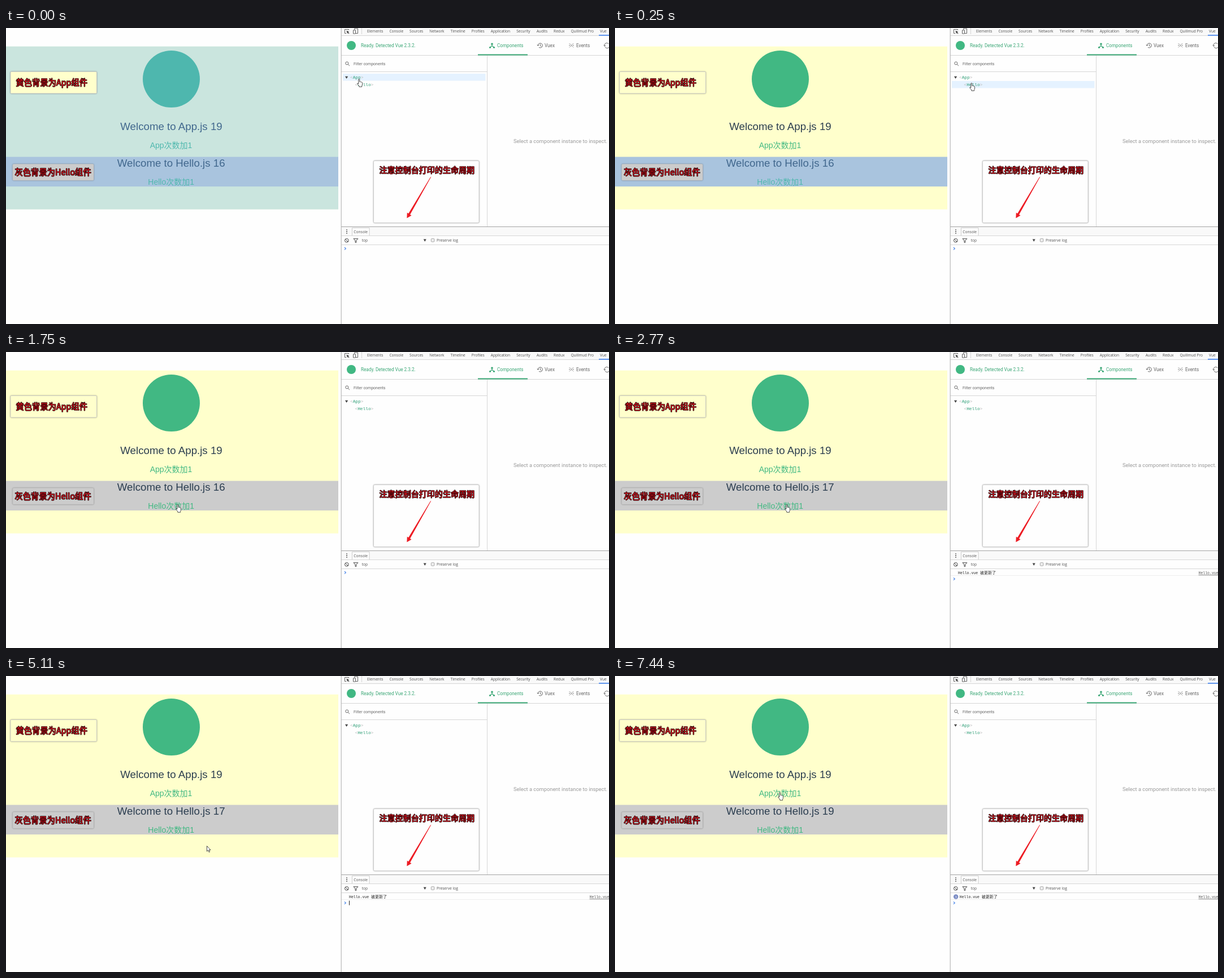
An HTML page that plays this animation: 1067 px wide and 525 px high, repeating every 8 s.

```html
<!DOCTYPE html>
<html lang="zh-CN">
<head>
<meta charset="utf-8">
<title>Component updates</title>
<style>
html, body { margin: 0; width: 100%; height: 100%; overflow: hidden; background: #fff; }
svg { display: block; }
text { white-space: pre; }
.page { font-family: "Liberation Sans", "Noto Sans CJK SC", "Noto Sans CJK JP", sans-serif; text-anchor: middle; }
.head { font-size: 18.7px; fill: #2c3e50; }
.link { font-size: 14px; fill: #42b983; }
.ui { font: 6.6px "Open Sans", "Noto Sans", sans-serif; fill: #505050; }
.vd { font: 8.16px Roboto, sans-serif; fill: #666; }
.green { fill: #3ba776; }
.tree { font: 7.8px "Liberation Mono", monospace; fill: #2f9e77; }
.tree tspan { fill: #bbb; }
.log { font: 6.5px "Liberation Mono", "Noto Sans CJK SC", "Noto Sans CJK JP", monospace; fill: #222; }
.note { font: 500 14.3px "Noto Sans CJK SC", "Noto Sans CJK JP", sans-serif; fill: #f0121f; stroke: #000; stroke-width: 1.4; stroke-linejoin: round; paint-order: stroke; }
.box { stroke: #c4c4c4; stroke-width: .8; filter: drop-shadow(0 0 1.3px rgba(0,0,0,.35)); }
.rule { fill: none; stroke: #d6d6d6; }
.icon { fill: none; stroke: #555; stroke-width: .9; }
</style>
</head>
<body>
<svg width="1067" height="525" viewBox="0 0 1067 525">
  <rect width="1067" height="525" fill="#fefefe"/>

  <!-- page -->
  <rect y="32.7" width="588" height="289" fill="#ffffcc"/>
  <rect y="228.6" width="588" height="52.5" fill="#ccc"/>
  <circle cx="292.5" cy="90.5" r="50.5" fill="#41b883"/>
  <g class="page">
    <text class="head" x="292.5" y="180.7">Welcome to App.js 19</text>
    <text class="link" x="292" y="213">App次数加1</text>
    <text class="head" x="292.2" y="245.6" id="title"></text>
    <text class="link" x="292.2" y="278">Hello次数加1</text>
  </g>
  <rect id="shade" width="588" fill="rgba(104,182,255,.35)"/>
  <rect class="box" x="8" y="77.5" width="152.5" height="38.5" rx="1.5" fill="#ffffcc"/>
  <text class="note" x="17.5" y="102">黄色背景为App组件</text>
  <rect class="box" x="12" y="241.5" width="143" height="28.5" rx="1.5" fill="#ccc"/>
  <text class="note" x="15.5" y="260.5">灰色背景为Hello组件</text>

  <!-- inspector tabs -->
  <rect x="593" width="474" height="13" fill="#f9f9f9"/>
  <path class="rule" d="M593 13.5H1067M629.5 0V11M593 48.5H1067M593 77.5H851M851.5 49V352"/>
  <path class="icon" d="M606.5 4V2.5H599.5V9.5H602"/>
  <path d="M602.5 4.5L607.5 7L605.5 7.8L607.5 9.8L606.6 10.5L604.8 8.6L604 10.3Z" fill="#444"/>
  <path class="icon" d="M616.5 3V1H622.5V9.5H619M614.5 4H618.5V10H614.5Z"/>
  <text class="ui" id="tabs" x="628" y="8.2"></text>
  <rect x="1049" y="12" width="18" height="1.6" fill="#4285f4"/>

  <!-- component panel -->
  <circle cx="611" cy="31" r="8" fill="#41b883"/>
  <text class="vd green" x="628" y="34.2">Ready. Detected Vue 2.3.2.</text>
  <rect class="green" x="835" y="46.5" width="88" height="2"/>
  <path d="M860 29V31.5L856.5 34.5M860 31.5L863.5 34.5" fill="none" stroke="#3ba776" stroke-width="1.2"/>
  <g class="green"><circle cx="860" cy="28.3" r="1.8"/><circle cx="856.5" cy="34.5" r="1.6"/><circle cx="863.5" cy="34.5" r="1.6"/></g>
  <text class="vd green" x="869" y="34.2">Components</text>
  <path class="icon" d="M941.3 31A4 4 0 1 1 943 34.3M939.8 29.8L941.3 31.6L943 30M945.3 28.5V31.3L947.3 32.5"/>
  <text class="vd" x="953" y="34.2">Vuex</text>
  <path class="icon" d="M997 27.5L1004 34.5M1004 27.5L997 34.5M996.3 31H998M1003 31H1004.7" stroke-dasharray="2 1"/>
  <text class="vd" x="1009" y="34.2">Events</text>
  <path class="icon" d="M1059.2 32A4 4 0 0 1 1066 28M1060 33.5A4 4 0 0 0 1067 34M1057.7 30.6L1059.2 32.3L1061 30.8"/>
  <circle class="icon" cx="603.3" cy="62.5" r="2.5"/>
  <path class="icon" d="M605.2 64.4L608 67.2"/>
  <text class="vd" x="615" y="65.7" style="font-size:7px">Filter components</text>
  <rect id="row" x="596" width="252.5" height="12.5" fill="#e5f2ff"/>
  <path d="M600 85.7H605.2L602.6 90Z" fill="#444"/>
  <text class="tree" x="609" y="90"><tspan>&lt;</tspan>App<tspan>&gt;</tspan></text>
  <text class="tree" x="617.5" y="102.8"><tspan>&lt;</tspan>Hello<tspan>&gt;</tspan></text>
  <text class="vd" x="898" y="204.2" style="font-size:9.33px;fill:#999">Select a component instance to inspect.</text>

  <rect class="box" x="650.5" y="235.5" width="186.5" height="110" rx="2" fill="#fefefe"/>
  <text class="note" x="660.5" y="257" style="font-size:14.05px">注意控制台打印的生命周期</text>
  <path d="M751.3 264L752 264.4L715 331L717.5 332.5L709.3 337.2L709.8 327.5L712.2 329Z" fill="#ed1c24"/>

  <!-- console -->
  <rect x="593" y="352" width="474" height="16.5" fill="#f9f9f9"/>
  <path d="M593 352.5H1067" stroke="#a3a3a3"/>
  <path class="rule" d="M593 368.5H1067M593 384.5H1067"/>
  <path d="M612.5 368V354.5H643V368" fill="#fefefe" stroke="#ccc"/>
  <path d="M603 357.2v1.6m0 1.5v1.6m0 1.5v1.6" stroke="#444" stroke-width="1.6"/>
  <text class="ui" x="615.3" y="364">Console</text>
  <circle class="icon" cx="602.8" cy="376.8" r="3.3" style="stroke:#333"/>
  <path class="icon" d="M600.5 374.5L605.1 379.1" style="stroke:#333"/>
  <path class="icon" d="M615 373.7H622.8L619.8 377V380.3H618V377Z" style="stroke:#333"/>
  <text class="ui" x="629.8" y="379.3">top</text>
  <path d="M738.7 374.5H743.7L741.2 379Z" fill="#444"/>
  <rect x="752.3" y="373.6" width="5.6" height="5.6" rx="1" fill="#eee" stroke="#999" stroke-width=".8"/>
  <text class="ui" x="762" y="379.3">Preserve log</text>
  <g id="entry">
    <path d="M593 396.5H1067" stroke="#eee"/>
    <text class="log" id="line" y="394">Hello.vue <tspan style="font-size:7px">被更新了</tspan></text>
    <text class="log" x="1032.5" y="394" style="fill:#555;text-decoration:underline">Hello.vue</text>
    <g id="badge">
      <circle cx="603.2" cy="391.5" r="4.2" fill="#7b8cc4"/>
      <text class="ui" id="count" x="603.2" y="393.8" text-anchor="middle" style="fill:#fff;font-size:6px"></text>
    </g>
  </g>
  <path id="prompt" d="M599 -2.2L601.3 0L599 2.2" fill="none" stroke="#3d7ee8" stroke-width="1.1"/>
  <path id="caret" d="M607.5 398.5V406.5" stroke="#222"/>
  <path d="M593.2 0V525" stroke="#ababab"/>

  <g id="cursor" fill="#fff" stroke="#222" stroke-width=".8" stroke-linejoin="round">
    <path id="arrow" d="M.5 .5V10L2.6 8L4.2 11.5L5.7 10.9L4.2 7.5H7Z"/>
    <path id="hand" d="M2.8 1.2Q3.8 .1 4.8 1.2V5.4Q5.8 4.9 6.5 5.7Q7.5 5.2 8.1 6.2Q9.5 6 9.5 7.4V10Q9.5 11.6 8.6 12.6V14.3H3.9V13L.7 9Q.8 7.6 2 8.2L2.8 9Z"/>
  </g>
</svg>
<script>
const LOOP = 8000, STEP = 120;
const $ = id => document.getElementById(id);
const set = (id, attrs) => { for (const k in attrs) $(id).setAttribute(k, attrs[k]); };
const show = (id, on) => $(id).style.display = on ? "" : "none";
const easeOut = p => 1 - (1 - p) ** 2.5;

const tabs = ["Elements", "Console", "Sources", "Network", "Timeline", "Profiles",
  "Application", "Security", "Audits", "Redux", "Quillmud Pro", "Vue"];
$("tabs").innerHTML = tabs.map(s => `<tspan dx="11">${s}</tspan>`).join("");

// cursor moves: start time, steps, end x, end y, pointing hand at the end
const moves = [
  [0, 1, 621, 90, true], [130, 1, 627, 97, true], [800, 1, 631, 121],
  [920, 2, 541, 270], [1190, 2, 335, 308], [1470, 3, 300, 270, true],
  [3180, 2, 656, 383], [3480, 2, 681, 390], [3750, 1, 655, 391],
  [3870, 2, 613, 391], [4140, 4, 606, 394], [4870, 3, 355, 301],
  [5230, 4, 304, 275, true], [6890, 2, 297, 233], [7170, 3, 288, 206, true]
];
const clicks = [2770, 5900, 6330];

function cursorAt(t) {
  const i = moves.findLastIndex(m => m[0] <= t);
  const [start, steps, x, y, hand] = moves[i];
  const [, , x0, y0] = moves[Math.max(i - 1, 0)];
  const p = Math.min(1, (Math.floor((t - start) / STEP) + 1) / steps);
  const mix = (a, b) => Math.round(a + (b - a) * easeOut(p));
  return { x: mix(x0, x), y: mix(y0, y), hand: hand && p === 1 };
}

function draw(t) {
  const { x, y, hand } = cursorAt(t);
  set("cursor", { transform: `translate(${x} ${y})` });
  show("hand", hand);
  show("arrow", !hand);

  const whole = t < 130;
  set("shade", whole ? { y: 32.7, height: 289 } : { y: 228.6, height: 52.5 });
  show("shade", t < 800);
  set("row", { y: t < 250 ? 81 : 94 });
  show("row", t < 920);

  const n = clicks.filter(c => c <= t).length;
  $("title").textContent = "Welcome to Hello.js " + (16 + n);
  show("entry", n);
  show("badge", n > 1);
  $("count").textContent = n;
  set("line", { x: n > 1 ? 609.8 : 607 });
  set("prompt", { transform: `translate(0 ${n ? 402.5 : 391.2})` });
  show("caret", t >= 4720 && t < 5230);
}

const start = performance.now();
function tick() {
  draw((performance.now() - start) % LOOP);
  requestAnimationFrame(tick);
}
tick();
</script>
</body>
</html>
```
